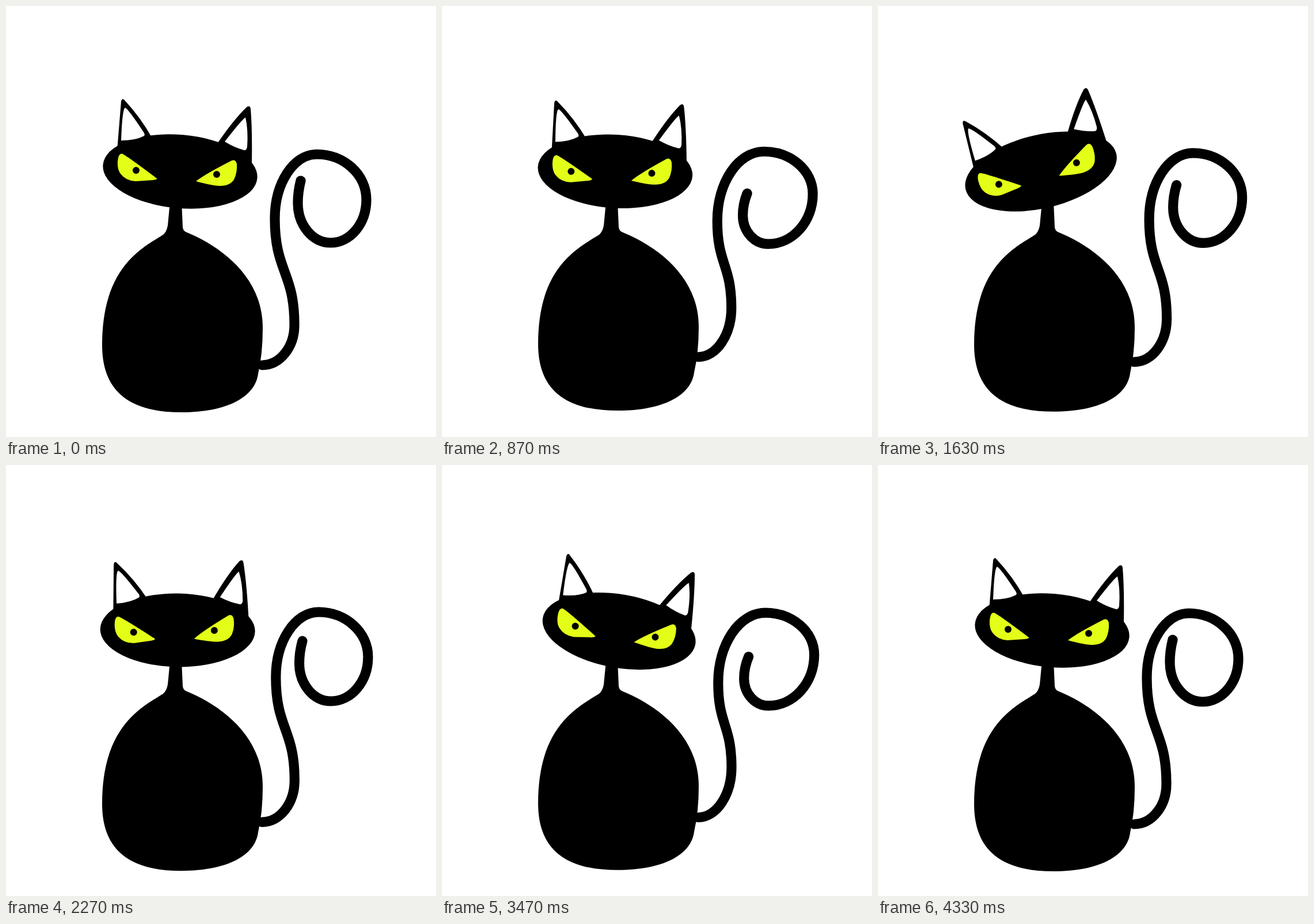
Recreate the animation shown at these times as an HTML page. Size 747 px wide and 750 px high, loop 4.36 s.

```html
<!DOCTYPE html>
<html lang="en">
<head>
<meta charset="utf-8">
<title>Black cat</title>
<style>
  html, body { margin: 0; height: 100%; overflow: hidden; background: #fff; }
  svg { display: block; width: 100%; height: 100%; }
  .white { fill: #fff; }
  .eye { fill: #e3ff18; }
</style>
</head>
<body>
<svg viewBox="0 0 747 750">
  <path id="tail" fill="none" stroke="#000" stroke-width="17.2" stroke-linecap="round"/>
  <path id="body" d="M285 340L281 382Q279 393 273 398C235 422 167 455 167 590C167 675 220 707 305 707C385 707 433 680 438 640Q446 605 446 560C446 471 373 418 312 393Q308 391 307 385L305 340Z"/>
  <g id="head">
    <path d="M193 252L200 166Q202 159 206 164Q234 194 254 230Z"/>
    <path d="M366 241Q395 198 418 176Q424 172 425 179Q428 215 427 275Z"/>
    <ellipse cx="302.5" cy="288" rx="134.5" ry="63.9" transform="rotate(5 302.5 288)"/>
    <path class="white" d="M207 177Q202 178 200 234Q225 234 240 226Q242 223 238 218Q213 180 207 177Z"/>
    <path class="white" d="M416 194Q411 196 380 236Q396 246 414 251Q418 251 419 245Q421 215 416 194Z"/>
    <path class="eye" d="M194 270Q195 257 201 257Q205 257 262 300Q263 302 255 303L225 305Q208 304 199 292Q193 284 194 270Z"/>
    <path class="eye" d="M330 305Q345 293 392 269Q399 266 401 275Q402 290 396 302Q389 313 372 313Q360 313 330 305Z"/>
    <circle cx="226" cy="286" r="6"/>
    <circle cx="366" cy="293" r="6"/>
  </g>
</svg>
<script>
const LOOP = 4360, FRAME = 100 / 3;
const ROUND = 0.552; // handle length that turns a cubic into a quarter ellipse

const [tail, body, head] = ['tail', 'body', 'head'].map(id => document.getElementById(id));

// Sine-eased step from 0 to 1
function ramp(time, start, end) {
  const u = Math.min(1, Math.max(0, (time - start) / (end - start)));
  return (1 - Math.cos(Math.PI * u)) / 2;
}

const pulse = (time, start, peak, end) => ramp(time, start, peak) - ramp(time, peak, end);

// The tail runs through the turning points of its curl
function tailPath(open, lift) {
  const at = (x, y, dx, dy) => [x + dx * open, y + (dy + 12) * open - 12 * lift];
  const base = at(445, 625, 0, -15), bulge = at(501, 555, 2, -33), waist = at(467, 370, 13, 6),
        top = at(540, 258, 22, -4), side = at(626, 337, 21, -10), bottom = at(564, 412, 3, 4),
        inner = at(507, 343, 18, 26), tip = at(512, 304, 21, 27);

  const mix = (a, b, k) => a + (b - a) * k;
  const toSide = (p, q) =>
    `C${mix(p[0], q[0], ROUND)} ${p[1]} ${q[0]} ${mix(q[1], p[1], ROUND)} ${q}`;
  const toFlat = (p, q) =>
    `C${p[0]} ${mix(p[1], q[1], ROUND)} ${mix(q[0], p[0], ROUND)} ${q[1]} ${q}`;
  const middle = mix(bulge[1], waist[1], 0.5);

  return `M${base}` + toSide(base, bulge) +
    `C${bulge[0]} ${middle} ${waist[0]} ${middle} ${waist}` +
    toFlat(waist, top) + toSide(top, side) + toFlat(side, bottom) + toSide(bottom, inner) +
    `Q${inner[0]} ${mix(inner[1], tip[1], 0.5)} ${tip}`;
}

function draw(now) {
  const time = Math.floor((now % LOOP + 5) / FRAME) * FRAME;
  const turn = -18.4 * ramp(time, 780, 1240) + 28.35 * ramp(time, 1890, 2640) - 9.95 * ramp(time, 3030, 3900);
  const breath = 1.05 * pulse(time, 0, 1050, 2050) + 1.02 * pulse(time, 1850, 3060, 4200);
  const open = 0.95 * pulse(time, 0, 1075, 1990) + 1.13 * pulse(time, 1990, 3200, 4333);

  head.setAttribute('transform', `rotate(${turn} 293 348)`);
  body.setAttribute('transform', `translate(0 395) scale(1 ${1 - breath / 104}) translate(0 -395)`);
  tail.setAttribute('d', tailPath(open, breath));

  requestAnimationFrame(() => draw(performance.now()));
}
draw(0);
</script>
</body>
</html>
```
